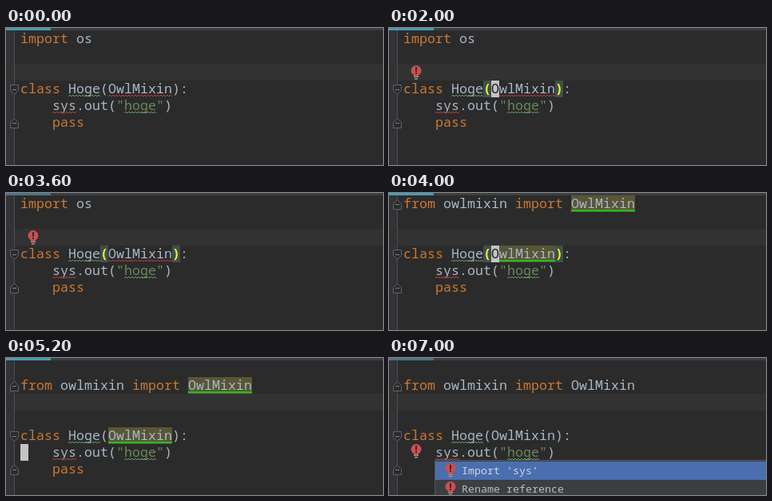
These frames come from a looping animation (472 px wide and 172 px high, 8000 ms). An HTML page with a canvas:

```html
<!DOCTYPE html>
<html lang="en">
<head>
<meta charset="utf-8">
<title>Auto import in a code editor</title>
<style>
html, body { margin: 0; width: 472px; height: 172px; overflow: hidden; background: #2b2b2b; }
canvas { display: block; }
</style>
</head>
<body>
<canvas id="stage" width="472" height="172"></canvas>
<script>
const g = document.getElementById('stage').getContext('2d');
const FAMILY = '"Source Code Pro", "Noto Sans Mono", monospace';
const LOOP = 8000, LEFT = 18, CELL = 10, ROW = 21;
const BG = '#2b2b2b', TEXT = '#a9b7c6', KEY = '#cc7832', STRING = '#6a8759';
const RED = '#bc3f3c', GREEN = '#659c6b';

// Font whose character cell has the given width
function mono(cell, weight = '') {
  g.font = `${weight} 100px ${FAMILY}`;
  return `${weight} ${cell * 100 / g.measureText('0').width}px ${FAMILY}`;
}
const CODE = mono(CELL), BOLD = mono(CELL, 'bold'), MENU = mono(8);

const colX = col => LEFT + col * CELL;
const rowY = row => 3 + row * ROW;

function box(x, y, w, h, color) {
  g.fillStyle = color;
  g.fillRect(x, y, w, h);
}

function text(s, x, y, color, font = CODE) {
  g.font = font;
  g.fillStyle = color;
  g.fillText(s, x, y);
}

// Parts alternate between text and colour
function line(row, col, ...parts) {
  for (let i = 0; i < parts.length; i += 2) {
    text(parts[i], colX(col), rowY(row) + 16, parts[i + 1]);
    col += parts[i].length;
  }
}

function wave(row, col, len, color) {
  const y = rowY(row) + 19;
  g.strokeStyle = color;
  g.lineWidth = 1;
  g.beginPath();
  for (let i = 0; i <= len * CELL; i += 2) g.lineTo(colX(col) + i, y + (i % 4 ? -1 : 1));
  g.stroke();
}

function usage(row, col) {
  box(colX(col), rowY(row), 80, ROW, '#595636');
  box(colX(col), rowY(row) + 18, 80, 2, '#1fc41c');
}

function bracket(row, col, s) {
  box(colX(col), rowY(row), CELL, ROW, '#3b514d');
  text(s, colX(col), rowY(row) + 16, '#ffef28', BOLD);
}

function caret(row, col, s = '') {
  box(colX(col), rowY(row), CELL, ROW, '#c4c4c4');
  text(s, colX(col), rowY(row) + 16, '#1c1c1c');
}

function fold(row, dir) {
  const y = rowY(row) + 11.5;
  g.beginPath();
  for (const [x, dy] of [[5.5, -6], [15.5, -6], [15.5, 1], [10.5, 6], [5.5, 1]]) {
    g.lineTo(x, y + dy * dir);
  }
  g.closePath();
  g.fillStyle = BG;
  g.fill();
  g.strokeStyle = '#606365';
  g.lineWidth = 1;
  g.stroke();
  box(8, y - 0.5, 5, 1, '#808284');
}

function bulb(x, y) {
  g.fillStyle = '#c9504f';
  g.beginPath();
  g.arc(x, y - 2.5, 6.5, 0, 7);
  g.fill();
  g.fillRect(x - 3, y + 2, 6, 3);
  box(x - 1, y - 7, 2, 6, '#3a2b2b');
  box(x - 1, y, 2, 2, '#3a2b2b');
  box(x - 3, y + 5, 6, 1, '#9a9a9a');
  box(x - 2, y + 7, 4, 1.5, '#9a9a9a');
}

function menu(x, y, items) {
  box(x, y, 472, 172, '#555859');
  box(x + 1, y + 1, 472, 172, '#3c3f41');
  items.forEach((s, i) => {
    const top = y + 2 + i * 23;
    if (!i) box(x + 1, top, 472, 23, '#4b6eaf');
    bulb(x + 20, top + 11);
    text(s, x + 34, top + 16, i ? '#bbbbbb' : '#d0d6e0', MENU);
  });
}

function draw(t) {
  const during = (a, b) => t >= a && t < b;
  const imported = t >= 3800;
  const shift = t >= 5200 ? 1 : 0;
  const cls = 3 + shift;
  const unfocused = during(2400, 3800) || t >= 7000;

  box(0, 0, 472, 172, BG);
  box(0, 0, 10, 172, '#313335');
  box(0, rowY(2), 472, ROW, '#323232');
  box(10, 0, 1, 172, '#4b4d4e');
  box(0, 0, 472, 3, '#3c3f41');
  box(0, 0, 56, 3, unfocused ? '#4d7386' : '#4a9bb0');

  if (t >= 4000) fold(shift, -1);
  fold(cls, 1);
  fold(cls + 2, -1);

  if (during(4000, 5400)) {
    usage(shift, 21);
    usage(cls, 11);
  }

  if (imported) line(shift, 0, 'from ', KEY, 'owlmixin ', TEXT, 'import ', KEY, 'OwlMixin', TEXT);
  else line(0, 0, 'import ', KEY, 'os', TEXT);
  line(cls, 0, 'class ', KEY, 'Hoge(OwlMixin):', TEXT);
  line(cls + 1, 4, 'sys.out(', TEXT, '"hoge"', STRING, ')', TEXT);
  line(cls + 2, 4, 'pass', KEY);

  wave(cls, 6, 4, GREEN);
  if (!imported) wave(cls, 11, 8, RED);
  wave(cls + 1, 4, 3, RED);
  wave(cls + 1, 13, 4, GREEN);

  if (during(1200, 5200)) {
    bracket(cls, 10, '(');
    bracket(cls, 19, ')');
  }

  if (during(800, 1200)) caret(2, 0);
  if (during(1200, 2400) || during(4000, 4800)) caret(cls, 11, 'O');
  if (during(5200, 6200)) caret(5, 0);
  if (during(6400, 7000)) caret(5, 4, 's');

  if (during(2000, 3800)) bulb(34, 56);
  if (t >= 7000) bulb(34, 117);

  if (during(2400, 3600)) menu(127, 86, [
    "Import 'owlmixin.OwlMixin(DictTransformer)'",
    "Create class 'OwlMixin'",
    'Rename reference',
    "Ignore unresolved reference 'test.OwlMixin'"
  ]);
  if (t >= 7000) menu(57, 128, ["Import 'sys'", 'Rename reference']);
}

const start = performance.now();
function tick() {
  draw((performance.now() - start) % LOOP);
  requestAnimationFrame(tick);
}
tick();
</script>
</body>
</html>
```
